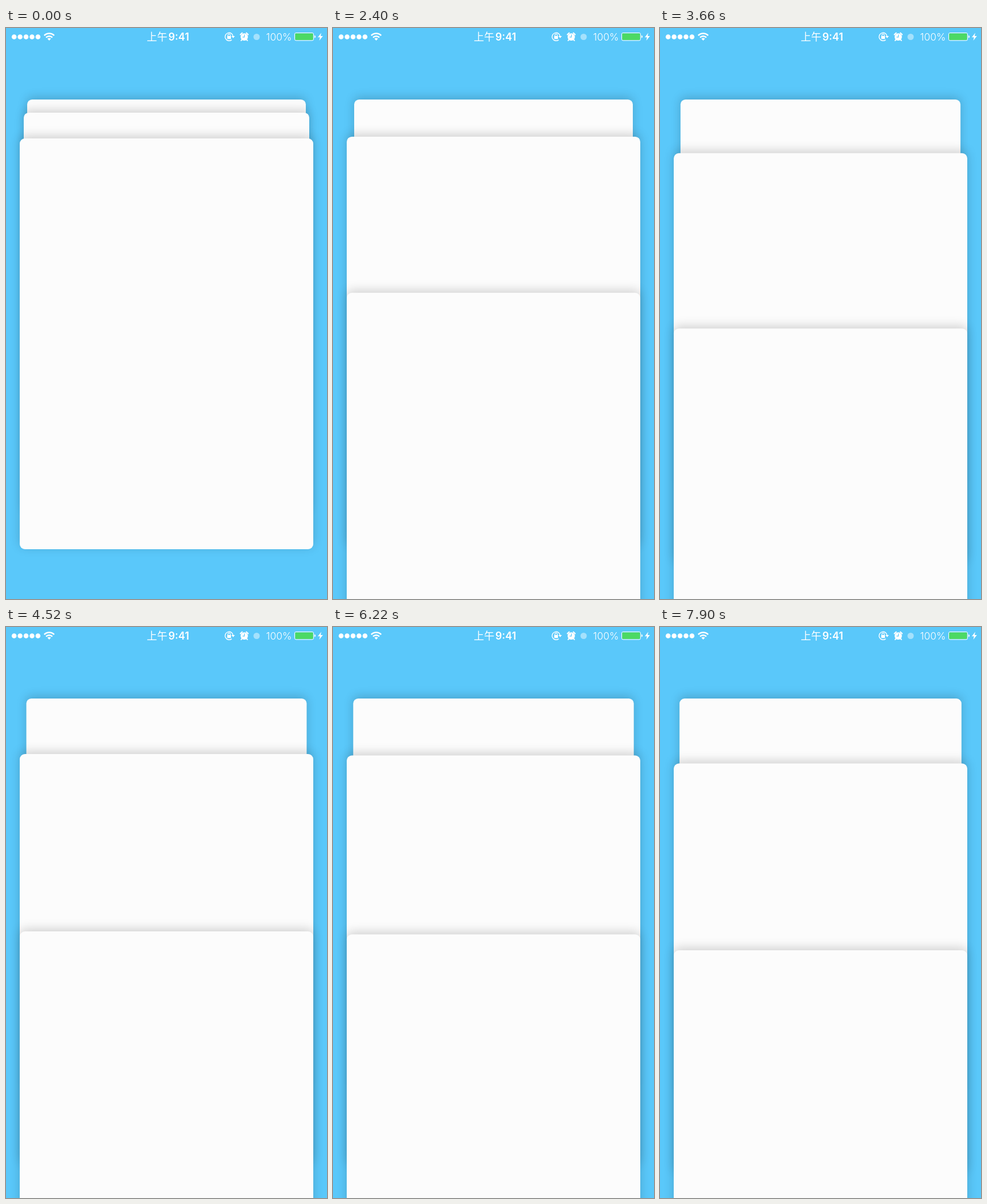
These frames come from a looping animation (561x998 px, 8 s). An HTML page:

```html
<!DOCTYPE html>
<html lang="zh">
<head>
<meta charset="utf-8">
<title>Card stack</title>
<style>
html, body { margin: 0; width: 100%; height: 100%; overflow: hidden; background: #5ac8fa; }
#stage { position: relative; width: 561px; height: 998px; overflow: hidden; background: #5ac8fa; }
.card {
  position: absolute; left: 24px; top: 0; width: 513px; height: 718px;
  border-radius: 9px; background: #fcfcfc; transform-origin: 50% 0;
  box-shadow: 0 -4px 18px rgba(0, 0, 0, .18);
}
svg { position: absolute; left: 0; top: 0; }
text { font-family: Inter, "Noto Sans CJK SC", "Noto Sans CJK", sans-serif; fill: #fff; }
</style>
</head>
<body>
<div id="stage">
  <div class="card"></div>
  <div class="card"></div>
  <div class="card"></div>
  <svg width="561" height="32" viewBox="0 0 561 32" fill="#fff">
    <path d="M14.2 15.5h41.8" fill="none" stroke="#fff" stroke-width="8.6" stroke-linecap="round" stroke-dasharray="0 10.42"/>
    <g fill="none" stroke="#fff" stroke-width="2.5">
      <path d="M66.8 13.2a12 12 0 0 1 17.4 0"/>
      <path d="M70 16.6a7.7 7.7 0 0 1 11 0"/>
    </g>
    <path d="M75.5 22l-3.1-3.2a4.4 4.4 0 0 1 6.2 0z"/>
    <text x="246" y="22" font-size="18" font-weight="500">上午</text>
    <text x="320" y="22" font-size="18" font-weight="600" text-anchor="end">9:41</text>

    <path d="M394.5 20.6a7 7 0 1 1 2.4-5.8" fill="none" stroke="#fff" stroke-width="1.4"/>
    <path d="M394 14h6l-3 3.8z"/>
    <rect x="386.6" y="14" width="6.6" height="5.2" rx=".6"/>
    <path d="M387.9 14v-1.6a2 2 0 0 1 4 0v1.6" fill="none" stroke="#fff" stroke-width="1.2"/>

    <circle cx="416.4" cy="15.6" r="6.4"/>
    <path d="M409.6 11.6l3.2-3M423.2 11.6l-3.2-3M412.4 20.4l-1.4 1.5M420.4 20.4l1.4 1.5" stroke="#fff" stroke-width="2" stroke-linecap="round"/>
    <path d="M416.6 11.6v4.3h-3.2" fill="none" stroke="#5ac8fa" stroke-width="1.2"/>

    <circle cx="438" cy="15.5" r="5.5" opacity=".45"/>
    <text x="499.5" y="22" font-size="17.5" font-weight="300" text-anchor="end">100%</text>

    <rect x="504.5" y="8.5" width="33" height="13.4" rx="2.4" fill="none" stroke="#fff"/>
    <rect x="505.4" y="9.4" width="31.2" height="11.6" rx="1.4" fill="#4cd964"/>
    <path d="M539 12.8q2 .5 2 2.4t-2 2.4z"/>
    <path d="M551 8.4l-6 7.8h3.8l-1.3 5.8 6.3-8h-4z"/>
  </svg>
</div>
<script>
const LOOP = 8000, TOP = 125, GAP = 10.32;
const cards = [...document.querySelectorAll('.card')];
const minY = [0, 23, 68], maxInset = [37, 31, 24];

// time in ms, top of the front card
const drag = [
  [0, 193], [120, 193], [900, 196], [1800, 353], [2900, 516],
  [4520, 532], [5480, 544], [6980, 530], [7900, 565], [8000, 565]
];
const slopes = drag.slice(1).map(([t, y], i) => (y - drag[i][1]) / (t - drag[i][0]));
// harmonic mean keeps the curve from overshooting
const tangents = drag.map((_, i) => {
  const a = slopes[i - 1] || 0, b = slopes[i] || 0;
  return a * b > 0 ? 2 * a * b / (a + b) : 0;
});

function frontY(t) {
  let i = 0;
  while (i < drag.length - 2 && t >= drag[i + 1][0]) i++;
  const [t0, y0] = drag[i], [t1, y1] = drag[i + 1];
  const d = t1 - t0, u = (t - t0) / d, w = 1 - u;
  return y0 * (1 + 2 * u) * w * w + y1 * u * u * (3 - 2 * u)
    + d * u * w * (tangents[i] * w - tangents[i + 1] * u);
}

function draw(now) {
  const front = Math.sqrt(frontY(now % LOOP) - TOP);
  cards.forEach((card, i) => {
    const v = front - (2 - i) * GAP;
    const y = TOP + Math.max(minY[i], v > 0 ? v * v : 0);
    const inset = Math.max(24, Math.min(maxInset[i], 34.7 - 1.8 * v));
    const scale = (561 - 2 * inset) / 513;
    card.style.transform = `translateY(${y.toFixed(2)}px) scale(${scale.toFixed(4)})`;
  });
}

const start = performance.now();
function tick() {
  draw(performance.now() - start);
  requestAnimationFrame(tick);
}
tick();
</script>
</body>
</html>
```
